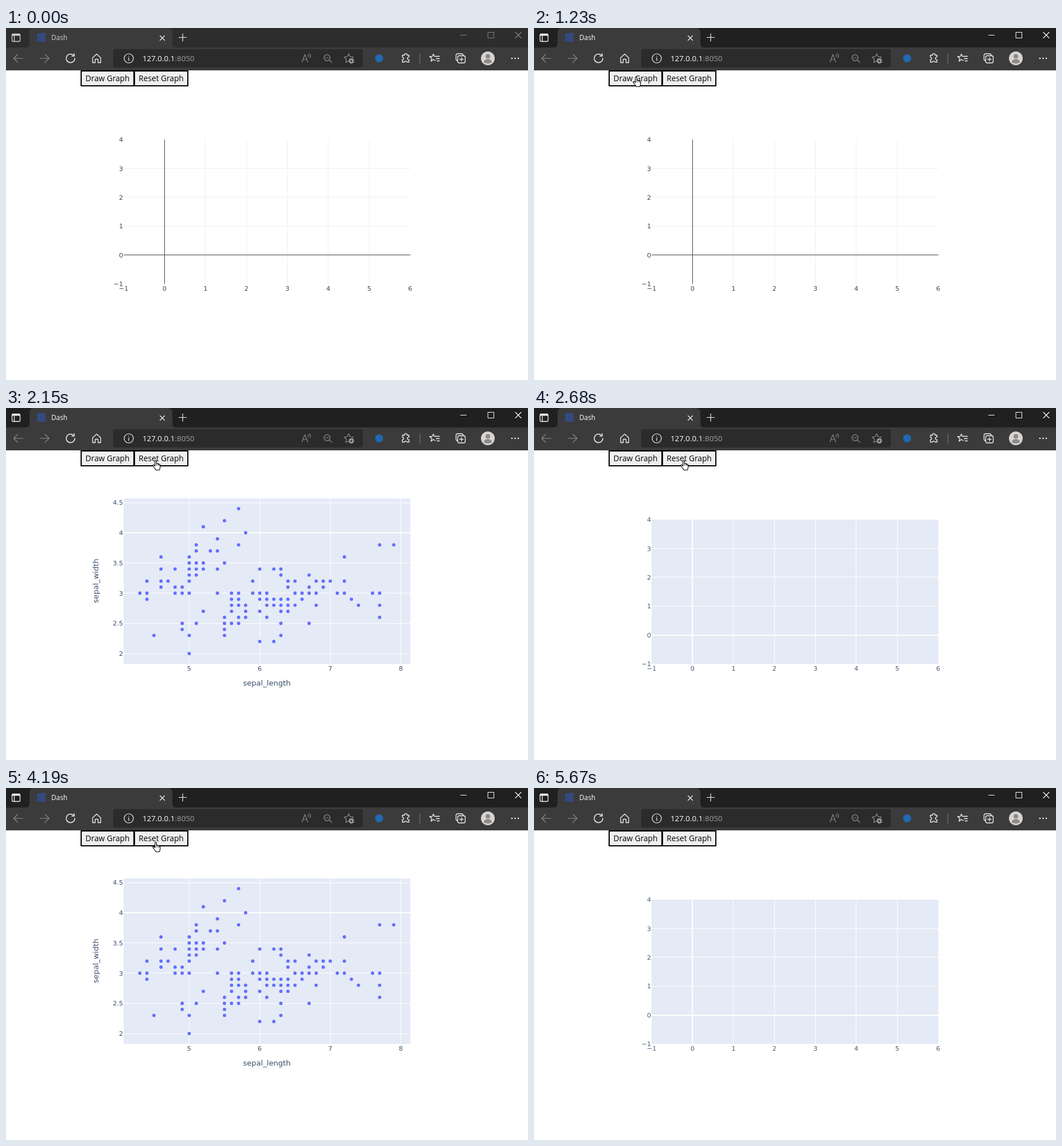
An HTML page with a canvas for the animation above (5.94 s loop, 910x615 px).

```html
<!DOCTYPE html>
<html lang="en">
<head>
<meta charset="utf-8">
<title>Dash</title>
<style>
html, body { margin: 0; width: 100%; height: 100%; overflow: hidden; background: #fff; }
canvas { display: block; }
</style>
</head>
<body>
<canvas id="stage" width="910" height="615"></canvas>
<script>
const ctx = document.getElementById('stage').getContext('2d');
const LOOP = 5940;
const UI = '"Open Sans", "Noto Sans", sans-serif';
const PLOT = '"DejaVu Sans", sans-serif';

// Sepal lengths (mm) per row; sepal width falls from 44 mm by 1 mm per row
const iris = [
  [57], [], [55], [52], [58], [54],
  [51, 57, 77, 79],
  [51, 53, 54],
  [46, 50, 72],
  [50, 51, 52, 55],
  [46, 48, 50, 51, 52, 54, 60, 62, 63],
  [50, 51, 63, 67],
  [44, 46, 47, 50, 59, 64, 65, 68, 69, 70, 72],
  [46, 48, 49, 64, 67, 69],
  [43, 44, 48, 49, 50, 54, 56, 57, 59, 60, 61, 65, 66, 67, 68, 71, 72, 76, 77],
  [44, 56, 57, 60, 61, 62, 63, 64, 66, 73],
  [56, 57, 58, 61, 62, 63, 64, 65, 68, 74, 77],
  [52, 56, 58, 60, 63, 64],
  [55, 57, 58, 61, 77],
  [49, 51, 55, 56, 57, 63, 67],
  [49, 55],
  [45, 50, 55, 63],
  [60, 62], [], [50]
];

// ---------- drawing helpers ----------
function rect(x, y, w, h, color) {
  ctx.fillStyle = color;
  ctx.fillRect(x, y, w, h);
}

function round(x, y, w, h, r, color) {
  ctx.fillStyle = color;
  ctx.beginPath();
  ctx.roundRect(x, y, w, h, r);
  ctx.fill();
}

function disc(x, y, r, color) {
  ctx.fillStyle = color;
  ctx.beginPath();
  ctx.arc(x, y, r, 0, Math.PI * 2);
  ctx.fill();
}

function text(s, x, y, size, family, color, align = 'left') {
  ctx.font = size + 'px ' + family;
  ctx.fillStyle = color;
  ctx.textAlign = align;
  ctx.fillText(s, x, y);
}

function icon(d, x, y, color, width = 1.2, fill) {
  const path = new Path2D(d);
  ctx.save();
  ctx.translate(x, y);
  ctx.lineJoin = ctx.lineCap = 'round';
  if (fill) { ctx.fillStyle = fill; ctx.fill(path); }
  if (width) { ctx.strokeStyle = color; ctx.lineWidth = width; ctx.stroke(path); }
  ctx.restore();
}

// Icons are centred on 0,0
const CROSS = 'M-4-4L4 4M4-4L-4 4';
const STAR = 'M0-8L2.4-3L8-2.2L4 1.7L5 7.2L0 4.6L-5 7.2L-4 1.7L-8-2.2L-2.4-3Z';
const LENS = 'M4 -1A5.3 5.3 0 1 1 -6.6 -1A5.3 5.3 0 1 1 4 -1M2.6 2.8L7 7M-4-1H1.4';
const ARROW_BACK = 'M8 0H-8M-1-7.2L-8 0L-1 7.2';
const ARROW_NEXT = 'M-8 0H8M1-7.2L8 0L1 7.2';
const RELOAD = 'M7.5 0A7.5 7.5 0 1 1 4.8-5.8M6.4-8.2V-4H2.2';
const HOME = 'M-7-1L0-7.5L7-1V7.5H2.5V2.5Q2.5 1.5 1.5 1.5H-1.5Q-2.5 1.5-2.5 2.5V7.5H-7Z';
const PUZZLE = 'M-6-5H-2.2A2.3 2.3 0 1 1 2.2-5H5.5V-1.6A2.3 2.3 0 1 0 5.5 2.8V7H2A2.2 2.2 0 0 0-2.2 7H-6V3A2.2 2.2 0 0 0-6-1.4Z';
const FAVORITES = 'M1 4L-2.5 2L-6.5 5.2L-5.3 0L-9-3L-4.4-3.5L-2.5-7.5L-.6-3.5H8M2.5 .5H8M4 4.5H8';
const COLLECTIONS = 'M-5 4.5Q-8 4-8 1V-5Q-8-8-5-8H1Q4-8 4.5-5.5M-2.5-4.5H5.5Q8-4.5 8-2V5.5Q8 8 5.5 8H-2.5Q-5 8-5 5.5V-2Q-5-4.5-2.5-4.5ZM1.5-1.5V5M-1.8 1.7H4.8';

// ---------- browser window ----------
function drawBrowser(focused) {
  const strip = focused ? '#202020' : '#2d2d2d';
  const bar = '#3b3b3b';
  const bright = '#f4f4f4';
  const dim = '#8d8d8d';
  const caption = focused ? '#fff' : '#858585';

  rect(0, 0, 910, 74, bar);
  rect(0, 0, 910, 34, strip);
  rect(35, 28, 262, 6, bar);
  round(0, 20, 41, 14, [0, 0, 6, 0], strip);
  round(290, 20, 30, 14, [0, 0, 0, 6], strip);
  round(41, 0, 249, 40, [7, 7, 0, 0], bar);

  icon('M-5-6H5Q7-6 7-4V5Q7 7 5 7H-5Q-7 7-7 5V-4Q-7-6-5-6ZM-3-3V7', 17.5, 16.5, focused ? bright : '#d0d0d0', 1.3);
  rect(11, 10.5, 13, 3, focused ? bright : '#d0d0d0');
  rect(54, 9, 15, 15, '#34497d');
  text('Dash', 79, 21, 11.8, UI, focused ? '#fff' : '#d2d2d2');
  icon(CROSS, 272.5, 17.5, bright, 1.2);
  icon('M-6.5 0H6.5M0-6.5V6.5', 308, 16.5, bright, 1.2);

  icon('M-5 0H5', 797.5, 12.5, caption, 1);
  icon('M-5-5H5V5H-5Z', 845.5, 12.5, caption, 1);
  icon('M-5-5L5 5M5-5L-5 5', 893, 12.5, caption, 1.1);

  round(187, 37, 435, 32, 4, '#2b2b2b');
  icon(ARROW_BACK, 21.5, 53, dim);
  icon(ARROW_NEXT, 67, 53, dim);
  icon(RELOAD, 112.5, 53, bright, 1.4);
  icon(HOME, 158, 53, bright, 1.3);
  icon('M8 0A8 8 0 1 1-8 0A8 8 0 1 1 8 0M0-1V4M0-3.8V-3.6', 214, 53, bright, 1.2);
  text('127.0.0.1', 238, 58, 13.3, UI, '#fff');
  text(':8050', 294.5, 58, 13.3, UI, '#a0a0a0');

  icon('M-7 6.5L-2-6.5L3 6.5M-5.3 2H1.3M3-6.5Q5-4.5 4-2M6-8Q9-5 7-1', 523, 53, dim, 1.1);
  icon(LENS, 561, 53, dim);
  icon(STAR, 597.5, 53, dim);
  disc(602, 57.5, 5.4, '#2b2b2b');
  disc(602, 57.5, 4.6, '#a0a0a0');
  icon('M-2.3 0H2.3M0-2.3V2.3', 602, 57.5, '#2b2b2b', 1.1);

  disc(650.5, 53, 7, '#2068b3');
  icon(PUZZLE, 697, 52.5, bright, 1.3);
  rect(721, 45, 1, 17, '#777');
  icon(FAVORITES, 747.5, 53, bright, 1.3);
  icon(COLLECTIONS, 792.5, 53, bright, 1.3);

  disc(840, 53, 12, '#d6d3d1');
  disc(840, 49.5, 4, '#8c8986');
  icon('M-7 7Q-7 1.5 0 1.5Q7 1.5 7 7Q0 11-7 7Z', 840, 53, '', 0, '#8c8986');
  for (const x of [882, 887.5, 893]) disc(x, 53, 1.3, bright);
}

function drawButton(label, x, w) {
  rect(x, 74, w, 28, '#000');
  rect(x + 2, 76, w - 4, 24, '#efefef');
  text(label, x + w / 2, 93, 13.7, UI, '#000', 'center');
}

// ---------- graph ----------
const vLine = (x, top, color, w = 1) => rect(Math.round(x - w / 2), top, w, 447 - top, color);
const hLine = (y, color, w = 1) => rect(205, Math.round(y - w / 2), 500, w, color);
const sign = n => String(n).replace('-', '\u2212');
const xTick = (n, x, color) => text(sign(n), x, 459.4, 11.2, PLOT, color, 'center');
const yTick = (n, y, color) => text(sign(n), 204, y + 4.2, 11.2, PLOT, color, 'right');

function drawEmpty(themed) {
  const ink = themed ? '#4a5b78' : '#444';
  const grid = themed ? '#fff' : '#eee';
  const zero = themed ? '#fff' : '#444';
  const zeroWidth = themed ? 2 : 1;
  const px = n => 276.4 + n * 71.36;
  const py = n => 396.6 - n * 50.36;

  if (themed) rect(205, 195, 500, 252, '#e4eaf6');
  for (let n = 1; n < 6; n++) vLine(px(n), 195, grid);
  for (let n = 1; n < 4; n++) hLine(py(n), grid);
  hLine(py(0), zero, zeroWidth);
  vLine(px(0), 195, zero, zeroWidth);
  for (let n = -1; n <= 6; n++) xTick(n, px(n), ink);
  for (let n = -1; n <= 4; n++) yTick(n, py(n), ink);
}

function drawScatter() {
  const ink = '#3b4e6c';
  const px = n => 319.4 + (n - 5) * 122.95;
  const py = n => 429 - (n - 2) * 105.5;

  rect(205, 158, 500, 289, '#e4eaf6');
  for (let n = 5; n <= 8; n++) {
    vLine(px(n), 158, '#fff');
    xTick(n, px(n), ink);
  }
  for (let n = 2; n <= 4.5; n += 0.5) {
    hLine(py(n), '#fff', n === 4 ? 2 : 1);
    yTick(n, py(n), ink);
  }
  iris.forEach((row, i) => {
    for (const len of row) disc(px(len / 10), py((44 - i) / 10), 2.9, '#636efa');
  });
  text('sepal_length', 454.7, 484.5, 13.1, PLOT, ink, 'center');
  ctx.save();
  ctx.translate(161.3, 302);
  ctx.rotate(-Math.PI / 2);
  text('sepal_width', 0, 0, 13.1, PLOT, ink, 'center');
  ctx.restore();
}

function drawModebar() {
  const tone = 'rgba(68,68,68,.3)';
  const box = 'M-6-6H6V6H-6Z';
  const tools = [
    [616, 'M-7-4H-3L-2-6H2L3-4H7V6H-7ZM3 1A3 3 0 1 1-3 1A3 3 0 1 1 3 1'],
    [641, 'M3-1A4.5 4.5 0 1 1-6-1A4.5 4.5 0 1 1 3-1M2 2L6 6'],
    [659, 'M-7 0H7M0-7V7M-2-5L0-7L2-5M-2 5L0 7L2 5'],
    [684, box + 'M-3 0H3M0-3V3'],
    [702, box + 'M-3 0H3'],
    [719, 'M-6-2V-6H-2M2-6H6V-2M6 2V6H2M-2 6H-6V2M-3-3L3 3M3-3L-3 3'],
    [737, 'M-7 0L0-6L7 0M-5-1V6H-1V2H1V6H5V-1']
  ];
  for (const [x, d] of tools) icon(d, x, 117.5, tone, 2);
  rect(759, 111, 14, 14, tone);
}

// ---------- pointer ----------
const poses = [];

// Moves the pointer in n jumps spread evenly from t0 to t1
function glide(t0, t1, n, from, to, ease = u => u * u * (3 - 2 * u)) {
  for (let i = 0; i < n; i++) {
    const u = ease((i + 1) / n);
    poses.push({
      t: t0 + (t1 - t0) * i / (n - 1),
      x: from[0] + (to[0] - from[0]) * u,
      y: from[1] + (to[1] - from[1]) * u
    });
  }
}

const DRAW = [178, 85], DRAW_AGAIN = [202, 91], RESET = [261, 91], RESET_AGAIN = [261, 94];
const EDGE = [156, 104], BELOW = [675, 542];
glide(130, 470, 6, [640, 490], EDGE, u => 1 - (1 - u) ** 2.2);
glide(800, 1070, 5, EDGE, DRAW);
glide(1480, 1750, 5, DRAW, RESET);
glide(2850, 3120, 5, RESET, DRAW_AGAIN);
glide(3850, 4190, 6, DRAW_AGAIN, RESET_AGAIN);
glide(4650, 4930, 5, RESET_AGAIN, BELOW);
glide(5130, 5600, 8, BELOW, [834, 604]);

const clicks = [1150, 2080, 2550, 3320, 4390];
const HAND = 'M-1.3 1.5Q-1.3.5 0 .5T1.3 1.5V6Q3.7 5.6 4 6.6Q5.8 6.3 6 7.4Q7.8 7.2 7.8 8.6V12Q7.8 14 6.4 17.5H.2Q-.5 15.5-3 12.5L-5.1 9.8Q-5.4 8.4-4 8.4Q-2.7 8.4-1.3 10.4Z';
const POINTER = 'M.5.5V16.5L4.2 13L6.6 18.5L9 17.5L6.6 12H11.7Z';

function poseAt(t) {
  if (t >= 5670) return null;
  let pose = null;
  for (const p of poses) if (p.t <= t) pose = p;
  return pose;
}

const inside = (p, x0, y0, x1, y1) => p && p.x >= x0 && p.x < x1 && p.y >= y0 && p.y < y1;

function drawPointer(t) {
  const p = poseAt(t);
  if (!p) return;
  const x = Math.round(p.x), y = Math.round(p.y);
  if (inside(p, 130, 74, 318, 102)) {
    icon(HAND, x, y, '#000', 1.1, '#fff');
    icon('M1.3 6V9.5M4 6.8V9.5M6 7.6V9.8', x, y, '#000', 0.8);
  } else {
    icon(POINTER, x, y, '#000', 1, '#fff');
  }
  if (clicks.some(c => t >= c && t < c + 68)) disc(x, y, 12, 'rgba(255,255,0,.47)');
}

// ---------- scene ----------
function draw(t) {
  rect(0, 0, 910, 615, '#fff');
  drawBrowser(t >= 1150);
  drawButton('Draw Graph', 130, 94);
  drawButton('Reset Graph', 223, 95);

  if (t < 1350) drawEmpty(false);
  else if (t < 2220 || (t >= 3520 && t < 4520)) drawScatter();
  else drawEmpty(true);

  if (inside(poseAt(t - 60), 130, 102, 775, 520)) drawModebar();
  drawPointer(t);
}

const start = performance.now();
function tick() {
  draw((performance.now() - start) % LOOP);
  requestAnimationFrame(tick);
}
tick();
</script>
</body>
</html>
```
